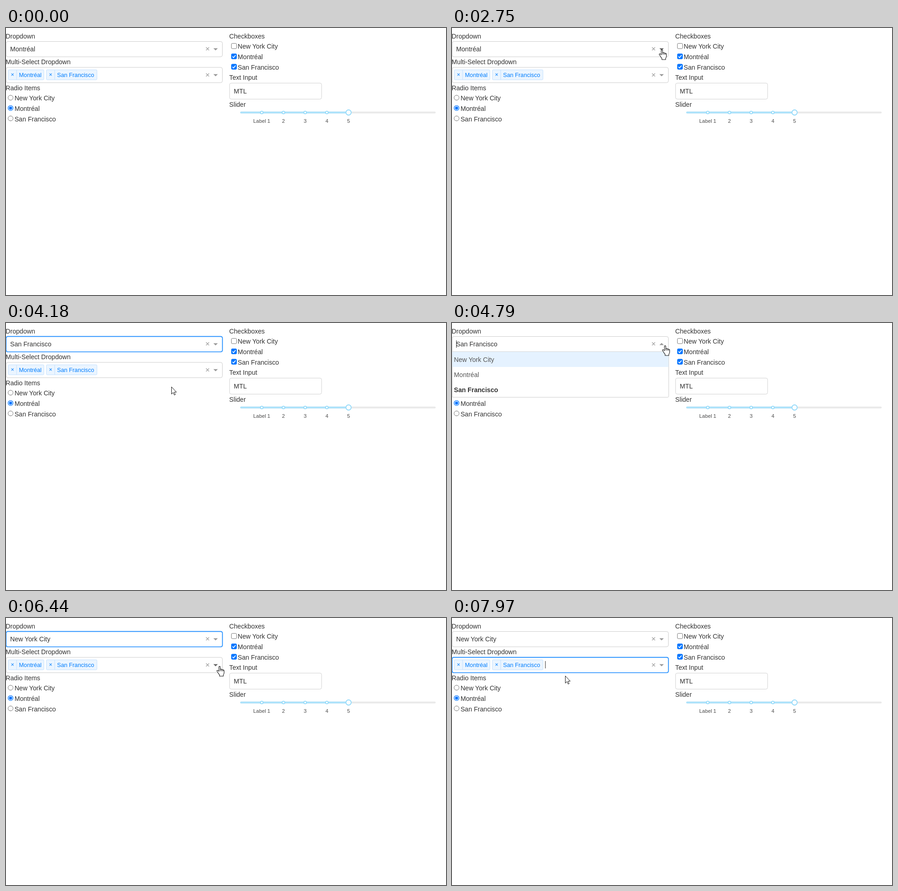
Animation, 961 px wide and 583 px high, one loop 8000 ms. Source, as an HTML page:

```html
<!DOCTYPE html>
<html lang="en">
<head>
<meta charset="utf-8">
<title>Form controls</title>
<style>
html, body { margin: 0; width: 100%; height: 100%; overflow: hidden; background: #fff; }
svg { display: block; width: 100%; height: 100%; }
text { font: 14.1px "Liberation Sans", Arial, sans-serif; fill: #323232; white-space: pre; }
.tag { font-size: 12.7px; fill: #007eff; }
.mark { font-size: 11.3px; fill: #4a4a4a; text-anchor: middle; }
.clear { font-size: 17px; fill: #999; text-anchor: middle; }
.option { fill: #555; }
.chosen { fill: #333; font-weight: bold; }
</style>
</head>
<body>
<svg viewBox="0 0 961 583" preserveAspectRatio="xMinYMin meet">
  <g id="form"></g>
  <g id="selects"></g>
  <g id="cursor">
    <path id="arrow" d="M.5 .5V16.2L4.1 12.8L6.6 18.3L8.9 17.3L6.5 12H11.3Z" fill="#fff" stroke="#111"/>
    <g id="hand" transform="translate(-6 -1)" fill="#fff" stroke="#111" stroke-width="1.1" stroke-linejoin="round">
      <path d="M5 11.5V2Q5 .6 6.5 .6Q8 .6 8 2V6.8Q10 5.9 11 7.4Q13 6.7 13.9 8.4Q16.4 8 16.4 10.5V14Q16.4 17 14.6 19V22H6.4V19.2Q4 16.8 2.6 13.8L.7 11Q.3 9.2 2 9.2Q3.5 9.4 5 11.5Z"/>
      <path d="M8 6.8V11M11 7.4V11.2M13.9 8.4V11.6" fill="none"/>
    </g>
  </g>
</svg>
<script>
const LOOP = 8000, BLINK = 530;
const LINE = 22.6, FIRST = 22.7;
const TOP1 = 29.5, TOP2 = 86, HEIGHT = 33.4, OPTION = 33.1;
const NYC = 'New York City', MTL = 'Montréal', SF = 'San Francisco';
const CITIES = [NYC, MTL, SF];

const $ = id => document.getElementById(id);
const text = (x, y, s, cls = '') => `<text x="${x}" y="${y}" class="${cls}">${s}</text>`;
const rect = (x, y, w, h, r, fill, stroke = 'none') =>
  `<rect x="${x}" y="${y}" width="${w}" height="${h}" rx="${r}" fill="${fill}" stroke="${stroke}"/>`;
const circle = (x, y, r, fill, stroke = 'none', w = 1) =>
  `<circle cx="${x}" cy="${y}" r="${r}" fill="${fill}" stroke="${stroke}" stroke-width="${w}"/>`;
const path = (d, stroke, w = 1, fill = 'none') =>
  `<path d="${d}" fill="${fill}" stroke="${stroke}" stroke-width="${w}"/>`;
const baseline = row => FIRST + row * LINE;

function radio(label, i) {
  const y = baseline(6 + i) - 6.1, on = label === MTL;
  return circle(10, y, 5.4, '#fff', on ? '#0075ff' : '#767676', on ? 1.3 : 1) +
    (on ? circle(10, y, 3.4, '#0075ff') : '') + text(18.7, y + 6.1, label);
}

function checkbox(label, i) {
  const y = baseline(1 + i) - 5.9, on = label !== NYC;
  return rect(492.3, y - 5.7, 11.3, 11.3, 2, on ? '#0075ff' : '#fff', on ? '#0075ff' : '#767676') +
    (on ? path(`M494.6 ${y + .2}l2.4 2.5 4.4-5.4`, '#fff', 1.7) : '') + text(506.1, y + 5.9, label);
}

function slider(y) {
  let s = rect(511.5, y - 1.9, 427, 3.8, 1.9, '#e9e9e9') + rect(511.5, y - 1.9, 236.5, 3.8, 1.9, '#abe2fb');
  for (let i = 1; i <= 5; i++) {
    const x = 511.2 + i * 47.4;
    s += circle(x, y, i < 5 ? 2.9 : 5.7, '#fff', '#96dbfa', 1.9) +
      text(x, y + 22.6, i > 1 ? i : 'Label 1', 'mark');
  }
  return s;
}

$('form').innerHTML =
  text(-.7, baseline(0), 'Dropdown') + text(-.7, baseline(2.5), 'Multi-Select Dropdown') +
  text(-.7, baseline(5), 'Radio Items') + CITIES.map(radio).join('') +
  text(487.6, baseline(0), 'Checkboxes') + CITIES.map(checkbox).join('') +
  text(487.6, baseline(4), 'Text Input') +
  rect(488.3, 120.3, 201, 35, 3.8, '#fff', '#d1d1d1') + text(497.6, 143.2, 'MTL') +
  text(487.6, 171.6, 'Slider') + slider(184.5);

function control(top, open, focus, [px, py]) {
  const y = top + HEIGHT / 2, r = open ? 0 : 3.8;
  const blue = focus && !open;
  const hover = !open && px < 473 && py > top && py < top + HEIGHT;
  const frame = `M.3 ${top + 3.8}q0-3.8 3.8-3.8H468.8q3.8 0 3.8 3.8V${top + HEIGHT - r}` +
    `q0 ${r} ${-r} ${r}H${.3 + r}q${-r} 0 ${-r} ${-r}Z`;
  const tip = open ? `M453 ${y + 2.1}h9.6l-4.8-4.8z` : `M453 ${y - 1.9}h9.6l-4.8 4.8z`;
  return (blue ? path(frame, 'rgba(0,126,255,.07)', 5) : '') +
    path(frame, blue ? '#007eff' : '#ccc', blue ? 1.4 : 1, '#fff') +
    text(440.3, y + 5.2, '×', 'clear') +
    path(tip, 'none', 0, hover && px > 450 ? '#666' : '#999');
}

function menu(top, options, focused, chosen) {
  const rows = options.map((o, i) => {
    const y = top + i * OPTION;
    return (i === focused ? rect(.5, y, 472.5, OPTION, 0, '#e5f2ff') : '') +
      text(4.3, y + 21.8, o, o === chosen ? 'chosen' : 'option');
  });
  return rect(.3, top, 473, options.length * OPTION, 2.5, '#fff', '#ccc') + rows.join('');
}

const tag = (x, w, label) =>
  rect(x, 91.3, w, 21.7, 2, '#ebf5ff', '#c2e0ff') + path(`M${x + 18.1} 91.3v21.7`, '#c2e0ff') +
  text(x + 5.6, 106.2, '×', 'tag') + text(x + 23.3, 106.5, label, 'tag');

const caret = (x, y) => path(`M${x} ${y}v16`, '#222');

// Each step overrides part of the state; open and focus name a select.
const STEPS = [
  { at: 0, value: MTL, open: 0, focus: 0, press: 0 },
  { at: 2880, open: 1, focus: 1, press: 2750 },
  { at: 4040, open: 0, value: SF },
  { at: 4790, open: 1, press: 4790 },
  { at: 5540, open: 0, value: NYC },
  { at: 6900, open: 2, focus: 2, press: 6900 },
  { at: 7500, open: 0 }
];
const stateAt = t => Object.assign({}, ...STEPS.filter(s => s.at <= t));

// Pointer moves: start, end, target x, target y
const MOVES = [
  [190, 470, 583, 417], [470, 960, 190, 20], [1030, 1240, 96, 4], [1240, 1800, 356, 43], [1870, 2350, 458, 48],
  [3280, 3770, 361, 139], [4250, 4660, 465, 50], [4950, 5420, 417, 77],
  [6090, 6440, 466, 106], [7500, 7900, 247, 126]
];

function pointerAt(t) {
  let x = 896, y = 566, moving = false;
  for (const [start, end, tx, ty] of MOVES) {
    if (t < start) break;
    const k = Math.min(1, (t - start) / (end - start));
    const ease = k * (2 - k);
    x += (tx - x) * ease;
    y += (ty - y) * ease;
    moving = k < .7;
  }
  return { x, y, moving };
}

function selects(t, { value, open, focus, press }, { x, y }) {
  const lit = Math.floor((t - press) / BLINK) % 2 === 0;
  const row = Math.min(2, Math.max(0, Math.floor((y - TOP1 - HEIGHT) / OPTION)));
  return control(TOP1, open === 1, focus === 1, [x, y]) + text(9, 51, value) +
    (open === 1 && lit ? caret(9.7, 38) : '') +
    control(TOP2, open === 2, focus === 2, [x, y]) + tag(5, 77.8, MTL) + tag(88.2, 110.5, SF) +
    (focus === 2 && lit ? caret(204, 94) : '') +
    (open === 1 ? menu(TOP1 + HEIGHT, CITIES, row, value) : '') +
    (open === 2 ? menu(TOP2 + HEIGHT, [NYC], 0) : '');
}

let last = '';
function render(t) {
  const state = stateAt(t), p = pointerAt(t);
  const s = selects(t, state, p);
  if (s !== last) $('selects').innerHTML = last = s;
  const hand = p.y < 120 && p.x > 450 || state.open && !p.moving;
  $('cursor').style.display = t < 190 ? 'none' : '';
  $('cursor').setAttribute('transform', `translate(${p.x.toFixed(1)} ${p.y.toFixed(1)})`);
  $('hand').style.display = hand ? '' : 'none';
  $('arrow').style.display = hand ? 'none' : '';
}

const start = performance.now();
function tick() {
  render((performance.now() - start) % LOOP);
  requestAnimationFrame(tick);
}
tick();
</script>
</body>
</html>
```
